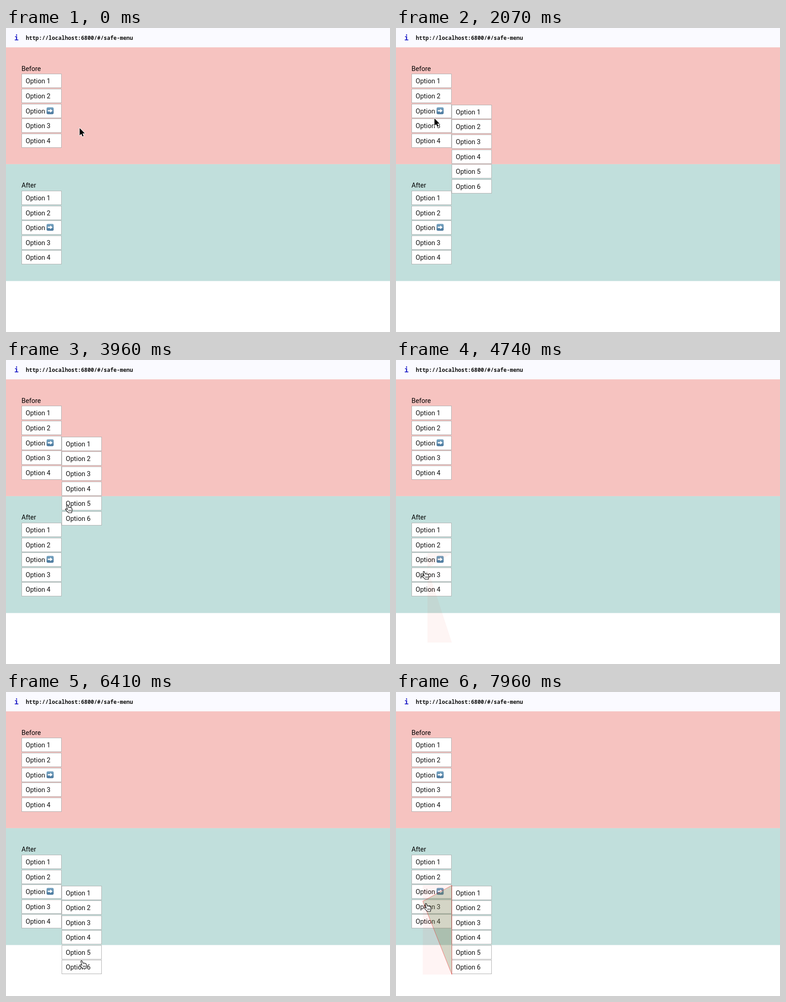
An HTML page with a canvas that plays this animation: 842 px wide and 665 px high, repeating every 8 s.

```html
<!DOCTYPE html>
<html lang="en">
<head>
<meta charset="utf-8">
<title>Safe menu</title>
<style>
html, body { margin: 0; width: 100%; height: 100%; overflow: hidden; background: #fff; }
canvas { display: block; }
</style>
</head>
<body>
<canvas id="stage" width="842" height="665"></canvas>
<script>
const ctx = document.getElementById('stage').getContext('2d');
const LOOP = 8000, HEADER = 42.3, PANEL = 255.6;
const ROW = 32.55, BOX_W = 88, BOX_H = 31, MAIN_X = 34, SUB_X = 122;
const UI = '14.5px Roboto, Inter, sans-serif';
const MAIN = ['Option 1', 'Option 2', 'Option', 'Option 3', 'Option 4'];
const SUB = [1, 2, 3, 4, 5, 6].map(n => 'Option ' + n);

// Panels with the times at which their submenu is open
const menus = [
  { title: 'Before', color: '#f6c3c0', open: [[700, 1355], [1575, 2110], [2640, 4050]] },
  { title: 'After', color: '#c1dfdc', open: [[4635, 4700], [5110, 7020], [7330, LOOP]], safe: true }
].map((m, i) => {
  const y = HEADER + i * PANEL;
  return { ...m, y, mainY: y + 58.1, subY: y + 125.6 };
});

// Pointer strokes: start, end, then waypoints evenly spaced in time
const strokes = [
  [40, 440, [88, 208]],
  [630, 780, [82, 171]],
  [930, 1070, [78, 179]],
  [1220, 1930, [92, 212], [86, 182], [84, 197.2]],
  [2040, 2810, [105, 222], [112, 183]],
  [2850, 3630, [144.5, 191], [165, 245], [164, 305]],
  [3670, 4370, [85, 335]],
  [4480, 5220, [62, 461], [56, 468], [62, 440]],
  [5370, 6150, [90, 475], [158, 540]],
  [6190, 6410, [166, 587]],
  [6670, 7440, [150, 605], [75, 480], [50, 435]],
  [7480, 7960, [40, 444], [66, 462]]
];

const path = [[0, 161.5, 219]];
for (const [start, end, ...points] of strokes) {
  path.push([start, ...path.at(-1).slice(1)]);
  points.forEach((p, i) => path.push([start + (end - start) * (i + 1) / points.length, ...p]));
}
path.push([LOOP, ...path.at(-1).slice(1)]);

const slope = (i, k) => (path[i + 1][k] - path[i][k]) / (path[i + 1][0] - path[i][0]);

// Monotone tangent: flat at turns and holds
function tangent(i, k) {
  if (i === 0 || i === path.length - 1) return 0;
  const a = slope(i - 1, k), b = slope(i, k);
  return a * b > 0 ? 2 * a * b / (a + b) : 0;
}

function pointer(t) {
  let i = 0;
  while (i < path.length - 2 && path[i + 1][0] <= t) i++;
  const h = path[i + 1][0] - path[i][0], u = (t - path[i][0]) / h, v = 1 - u;
  return [1, 2].map(k =>
    path[i][k] * v * v * (1 + 2 * u) + path[i + 1][k] * u * u * (3 - 2 * u) +
    h * u * v * (tangent(i, k) * v - tangent(i + 1, k) * u));
}

const isOpen = (menu, t) => menu.open.some(([a, b]) => t >= a && t < b);

function text(s, x, y, font = UI, color = '#000') {
  ctx.font = font;
  ctx.fillStyle = color;
  ctx.fillText(s, x, y);
}

function band(color, y, h) {
  ctx.fillStyle = color;
  ctx.fillRect(0, y, 842, h);
}

function arrowIcon(x, y) {
  const g = ctx.createLinearGradient(0, y, 0, y + 15);
  g.addColorStop(0, '#78a5c2');
  g.addColorStop(1, '#47759b');
  ctx.fillStyle = g;
  ctx.beginPath();
  ctx.roundRect(x, y, 15.5, 15, 3);
  ctx.fill();
  ctx.save();
  ctx.translate(x, y);
  ctx.fillStyle = '#fff';
  ctx.fill(new Path2D('M2.5 6H7.8V3.2L13.2 7.5 7.8 11.8V9H2.5Z'));
  ctx.restore();
}

function list(labels, x, top) {
  labels.forEach((label, i) => {
    const y = Math.round(top + i * ROW);
    ctx.fillStyle = '#b0b0b0';
    ctx.fillRect(x, y, BOX_W, BOX_H);
    ctx.fillStyle = '#fff';
    ctx.fillRect(x + 1, y + 1, BOX_W - 2, BOX_H - 2);
    text(label, x + 9, y + 21, UI, '#111');
    if (label === 'Option') arrowIcon(x + 55, y + 7.5);
  });
}

function poly(points) {
  ctx.beginPath();
  points.forEach(p => ctx.lineTo(...p));
  ctx.closePath();
}

const TOP = 423, BOTTOM = 618, EDGE = 122.5, LAG = 85;

function safeArea([x, y]) {
  ctx.fillStyle = 'rgb(255 0 0 / 0.045)';
  ctx.fillRect(x, TOP, EDGE - x, BOTTOM - TOP);
  poly([[x, y], [EDGE, BOTTOM], [EDGE, TOP]]);
  ctx.fillStyle = 'rgb(114 140 89 / 0.3)';
  ctx.fill();
  ctx.strokeStyle = 'rgb(255 0 0 / 0.5)';
  ctx.lineWidth = 0.9;
  ctx.stroke();
}

// Faint trace left once the safe area is gone
function trace(x, y) {
  poly([[x, TOP], [EDGE, TOP], [x, y], [EDGE, BOTTOM], [x, BOTTOM]]);
  ctx.fillStyle = 'rgb(235 70 40 / 0.05)';
  ctx.fill();
}

function inList(x, y, left, top, count) {
  if (x < left || x >= left + BOX_W) return false;
  for (let i = 0; i < count; i++) {
    const d = y - Math.round(top + i * ROW);
    if (d >= 0 && d < BOX_H) return true;
  }
  return false;
}

const arrow = new Path2D('M0 0V16L3.7 12.5 6.2 18.3 8.6 17.2 6.2 11.6H11.3Z');
const hand = new Path2D('M3.2 2.6C2.6.9 5 0 5.8 1.6L8 6.4C8.5 5.6 9.8 5.6 10.3 6.4 10.9 5.8 12.3 6 12.6 7 ' +
  '13.6 6.6 14.8 7.2 15 8.4 15.6 10.6 16.4 13 14.8 15.4L14.6 18H7.2L6.6 16.6C4.6 15 2.6 13 1 11 .2 9.6 2 8.6 3.4 9.8L5.4 11Z');
const knuckles = new Path2D('M8.4 11.5V15M10.6 11.5V15M12.8 11.5V15');

function cursor(x, y, over) {
  ctx.save();
  ctx.lineJoin = 'round';
  if (over) {
    ctx.translate(x - 5, y);
    ctx.fillStyle = '#fff';
    ctx.strokeStyle = '#111';
    ctx.lineWidth = 1.2;
    ctx.fill(hand);
    ctx.stroke(hand);
    ctx.lineWidth = 0.9;
    ctx.stroke(knuckles);
  } else {
    ctx.translate(x, y);
    ctx.strokeStyle = '#fff';
    ctx.lineWidth = 2;
    ctx.stroke(arrow);
    ctx.fillStyle = '#000';
    ctx.fill(arrow);
  }
  ctx.restore();
}

function draw(t) {
  const [x, y] = pointer(t);
  let over = false;
  band('#fff', 0, 665);
  band('#fafaff', 0, HEADER);
  text('i', 18, 27, 'bold 16px "DejaVu Sans Mono", monospace', '#2020c8');
  text('http://localhost:6800/#/safe-menu', 43.5, 25.5, '600 11.87px "Noto Sans Mono", monospace', '#111');

  for (const m of menus) {
    band(m.color, m.y, PANEL);
    text(m.title, MAIN_X, m.y + 51.5);
    list(MAIN, MAIN_X, m.mainY);
    over ||= inList(x, y, MAIN_X, m.mainY, MAIN.length);
  }
  for (const m of menus) {
    if (!isOpen(m, t)) continue;
    list(SUB, SUB_X, m.subY);
    over ||= inList(x, y, SUB_X, m.subY, SUB.length);
    if (m.safe && x < SUB_X) safeArea(pointer(t - LAG));
  }
  if (t >= 4700 && t < 5110) trace(69, 455);
  cursor(x, y, over);
}

function tick() {
  draw(performance.now() % LOOP);
  requestAnimationFrame(tick);
}
tick();
</script>
</body>
</html>
```
